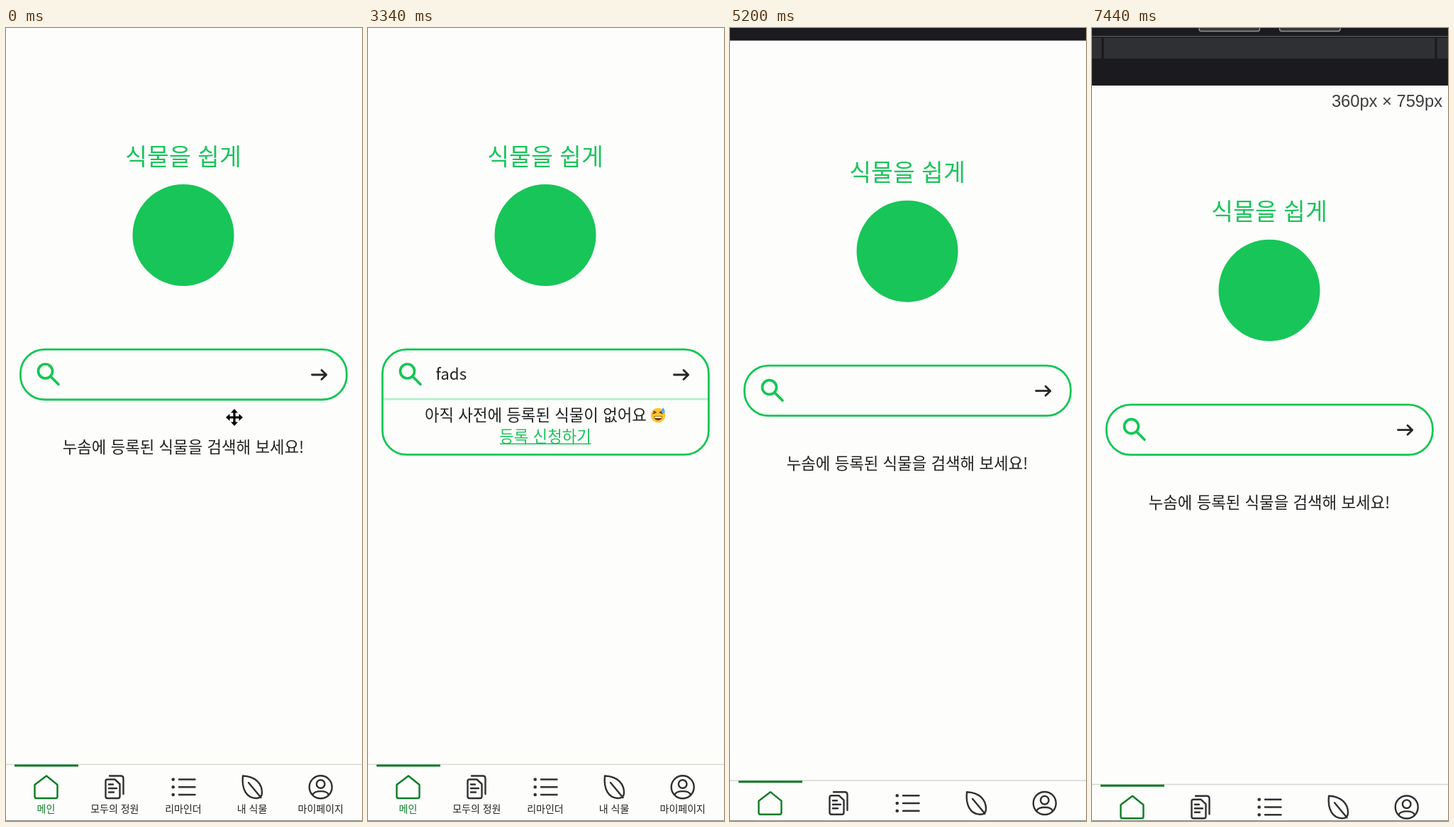
Write an HTML page that moves like this. It is 502x1116 px and loops after 7460 ms.

```html
<!DOCTYPE html>
<html lang="ko">
<head>
<meta charset="utf-8">
<title>식물 검색</title>
<style>
  html, body { margin: 0; width: 100%; height: 100%; overflow: hidden; background: #fdfdfc; }
  svg { display: block; width: 502px; height: 1116px; }
  text { font-family: "Noto Sans CJK KR", "Noto Sans CJK", "Noto Sans", sans-serif; font-size: 22.35px; fill: #212121; }
  .mid { text-anchor: middle; }
  .line { fill: none; stroke-linecap: round; stroke-linejoin: round; }
  .green { stroke: #15c654; }
  #nav text { font-size: 14px; }
  #nav .line { stroke: #303030; stroke-width: 2.4; }
  #nav .active { stroke: #0a7c26; }
</style>
</head>
<body>
<svg viewBox="0 0 502 1116">
  <rect width="502" height="1116" fill="#fdfdfc"/>
  <g id="screen">
    <g id="devtools" transform="translate(0 -86)">
      <rect y="0" width="502" height="81" fill="#1b1b1f"/>
      <g fill="#35363a" stroke="#94948a" stroke-width="1.4">
        <rect x="151" y="-20" width="85.5" height="24.5" rx="3"/>
        <rect x="264.5" y="-20" width="85.5" height="24.5" rx="3"/>
      </g>
      <rect y="11" width="502" height="1.4" fill="#55554f"/>
      <rect y="14" width="502" height="29" fill="#2e3034"/>
      <path d="M15 14V43M485 14V43" stroke="#19191c" stroke-width="3"/>
    </g>

    <g id="content">
      <text class="mid" x="250" y="192.5" style="font-size:33.5px;fill:#1dc35c">식물을 쉽게</text>
      <circle cx="250" cy="291.5" r="71.5" fill="#18c558"/>
      <rect id="box" class="line green" x="20.4" y="452.4" width="460" height="70.6" rx="34" stroke-width="2.8"/>
      <g class="line green" stroke-width="3.7">
        <circle cx="55.5" cy="483" r="10"/>
        <path d="M63 490.5L74 501.5"/>
      </g>
      <path class="line" d="M431.5 488H451M445 481.5L451.7 488L445 494.5" stroke="#262626" stroke-width="2.8"/>
      <text id="query" x="95.5" y="494.5"></text>
      <rect id="caret" y="475.5" width="1.6" height="25" fill="#111"/>
      <text id="help" class="mid" x="250" y="598">누솜에 등록된 식물을 검색해 보세요!</text>
      <g id="results">
        <path d="M22 522.3H479" stroke="#b9f0cf" stroke-width="3"/>
        <text x="80" y="553">아직 사전에 등록된 식물이 없어요</text>
        <g transform="translate(409 545)">
          <circle r="10.3" fill="#fdc42f"/>
          <path d="M-6 1.5H6C5.5 9 -5.5 9 -6 1.5Z" fill="#6b3a12"/>
          <path d="M-5 2H5V4H-5Z" fill="#fff"/>
          <path class="line" d="M-7 -2.5L-3 -4L-6 -5.5M6 -2.5L2.5 -4L5.5 -5.5" stroke="#6b3a12" stroke-width="1.4"/>
          <path d="M7 -11C10 -7 11 -3 7.5 -3S4 -7 7 -11Z" fill="#55aef0"/>
        </g>
        <text class="mid" x="250" y="583" style="fill:#1dc35c">등록 신청하기</text>
        <path d="M186 585.3H314.5" stroke="#1dc35c" stroke-width="1.6"/>
      </g>
    </g>

    <g id="nav">
      <rect y="1036" width="502" height="200" fill="#fdfdfc"/>
      <path d="M0 1036.3H502" stroke="#d6d6cc" stroke-width="1.3"/>
      <path d="M12 1038H102" stroke="#0a7c26" stroke-width="3"/>
      <path class="line active" d="M57 1052.5L72.5 1065V1081.5Q72.5 1084 70 1084H43Q40.5 1084 40.5 1081.5V1065Z"/>
      <g class="line">
        <path d="M143 1057.5H153.5L160.5 1064V1081.5Q160.5 1084 158 1084H143Q140.5 1084 140.5 1081.5V1060Q140.5 1057.5 143 1057.5Z"/>
        <path d="M146 1052.5H162Q165.5 1052.5 165.5 1056V1078M145 1064.5H151M145 1070H156M145 1075.5H152"/>
        <path d="M244 1057.5H266.5M244 1068.3H266.5M244 1079H266.5"/>
        <path stroke-width="5" style="stroke-width:4.6" d="M235.7 1057.5h.01M235.7 1068.3h.01M235.7 1079h.01"/>
        <path d="M334 1052.5C352 1053 361 1064 361 1076Q361 1084 353 1084C339 1084 332 1071 334 1052.5ZM342 1062L359.5 1083"/>
        <circle cx="443.7" cy="1068.3" r="16"/>
        <circle cx="443.7" cy="1064" r="5.8"/>
        <path d="M432.5 1079C435 1072.5 452.5 1072.5 455 1079"/>
      </g>
      <g class="mid">
        <text x="56.5" y="1104" style="fill:#0a7c26">메인</text>
        <text x="153.3" y="1104">모두의 정원</text>
        <text x="250" y="1104">리마인더</text>
        <text x="347" y="1104">내 식물</text>
        <text x="443.8" y="1104">마이페이지</text>
      </g>
    </g>
  </g>
  <text id="size" x="494" y="111" text-anchor="end" style="font-family:'Liberation Sans',sans-serif;font-size:23.7px;fill:#3c3c3c"></text>
  <path d="M0 1115.5H502" stroke="#85857c" stroke-width="1"/>
  <path id="move" transform="translate(322 548)" fill="#000" stroke="#fff" stroke-width="1" paint-order="stroke"
    d="M0 -12L5 -6.5H1.6V-1.6H6.5V-5L12 0L6.5 5V1.6H1.6V6.5H5L0 12L-5 6.5H-1.6V1.6H-6.5V5L-12 0L-6.5 -5V-1.6H-1.6V-6.5H-5Z"/>
  <circle id="touch" r="15.7" fill="#000" fill-opacity=".45"/>
</svg>
<script>
  const LOOP = 7460;
  const PAGE_SCALE = 1.395;
  const FOCUS = 1180, RELOAD = 4400;
  const KEYS = [[1980, 'f'], [2180, 'fa'], [2380, 'fad'], [2640, 'fads']];
  const TOUCH_IN = [[300, 318, 538], [820, 302, 512], [1150, 296, 506], [1980, 296, 506]];
  const TOUCH_OUT = [[3500, 296, 506], [3980, 407, 315], [4120, 407, 315], [4340, 522, 260]];

  const el = id => document.getElementById(id);
  const clamp = v => Math.min(1, Math.max(0, v));
  const ease = p => p * p * (3 - 2 * p);
  const progress = (t, from, to) => clamp((t - from) / (to - from));
  const shift = (id, x, y) => el(id).setAttribute('transform', `translate(${x} ${y})`);
  const show = (id, on) => el(id).setAttribute('visibility', on ? 'visible' : 'hidden');

  function along(path, t) {
    if (t < path[0][0] || t >= path[path.length - 1][0]) return null;
    const i = path.findIndex(stop => stop[0] > t);
    const [t0, x0, y0] = path[i - 1], [t1, x1, y1] = path[i];
    const p = ease(progress(t, t0, t1));
    return [x0 + (x1 - x0) * p, y0 + (y1 - y0) * p];
  }

  function drawSearch(t) {
    const key = KEYS.filter(k => k[0] <= t).pop();
    const typed = key && t < RELOAD;
    const query = el('query');
    query.textContent = typed ? key[1] : '';
    el('box').setAttribute('height', typed ? 148 : 70.6);
    show('results', typed);
    show('help', !typed);

    const blinkStart = key ? key[0] : FOCUS;
    show('caret', t >= FOCUS && t < RELOAD && (t - blinkStart) % 1000 < 500);
    el('caret').setAttribute('x', 95.3 + (typed ? query.getComputedTextLength() : 0));

    const raised = t >= RELOAD ? 21 * (1 - progress(t, 4740, 4840)) : 0;
    shift('help', 0, -raised);
  }

  function drawPage(t) {
    const scroll = 86 * ease(progress(t, 5100, 5400));
    const shrink = Math.round(41 * ease(progress(t, 5900, 6560)));
    shift('screen', 0, scroll);
    shift('content', 0, -shrink * 0.202);
    shift('nav', 0, -shrink * PAGE_SCALE - shrink / 41 * 0.6);
    show('size', t >= 5900);
    el('size').textContent = `360px × ${800 - shrink}px`;
  }

  function drawPointer(t) {
    show('move', t < 300);
    const at = along(TOUCH_IN, t) || along(TOUCH_OUT, t);
    show('touch', at);
    if (at) shift('touch', ...at);
  }

  function frame(now) {
    const t = (now - start) % LOOP;
    drawSearch(t);
    drawPage(t);
    drawPointer(t);
    requestAnimationFrame(frame);
  }

  const start = performance.now();
  frame(start);
</script>
</body>
</html>
```
